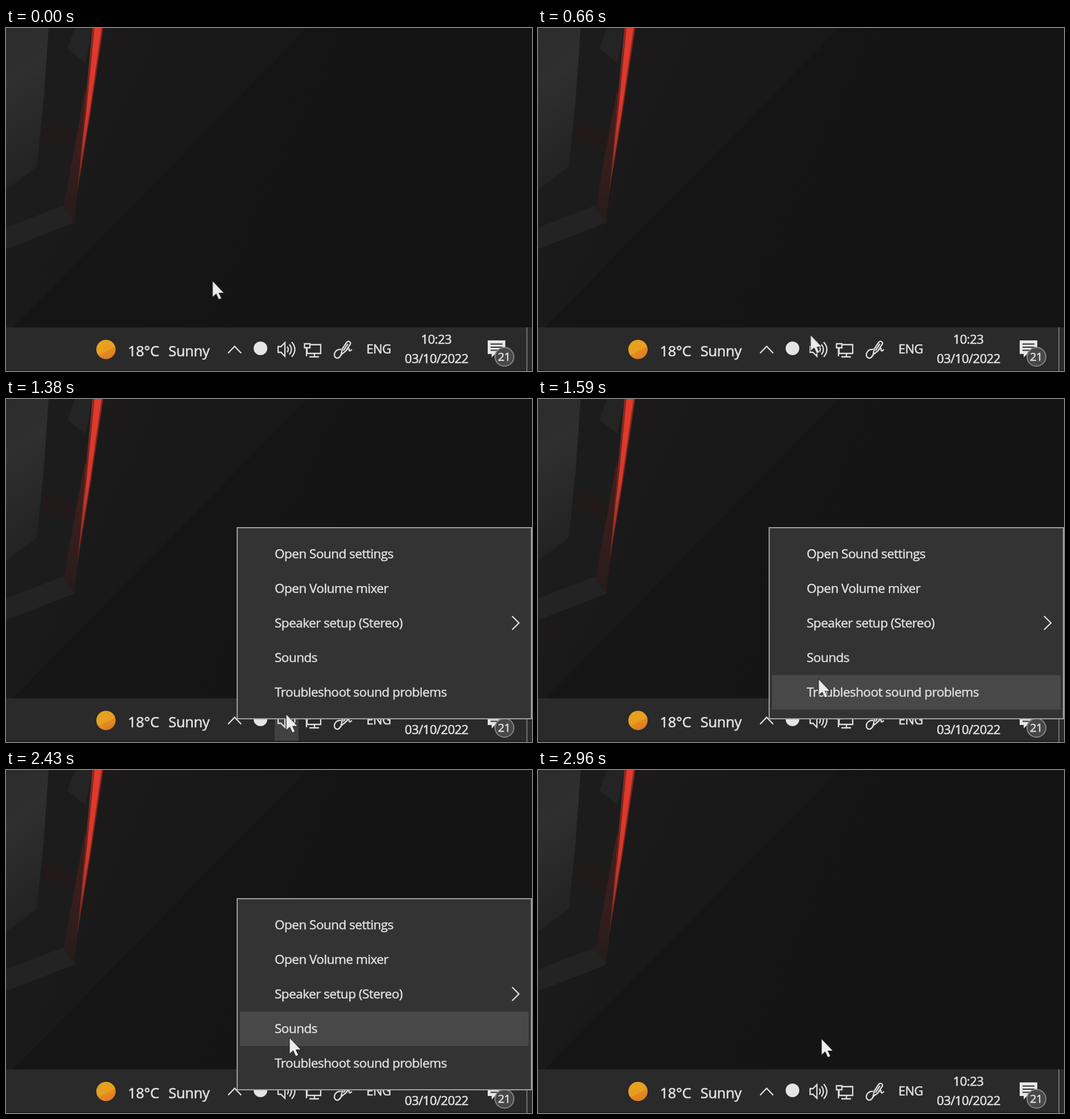
An HTML page that plays this animation: 926x605 px, repeating every 3.03 s.

```html
<!DOCTYPE html>
<html lang="en">
<head>
<meta charset="utf-8">
<title>Opening the sound menu</title>
<style>
  html, body { margin: 0; width: 100%; height: 100%; overflow: hidden; background: #141414; }
  svg { display: block; width: 926px; height: 605px; }
  text {
    font-family: "Open Sans", "Noto Sans", sans-serif;
    font-size: 22px; letter-spacing: -.5px; white-space: pre;
    fill: #e0e0e0; stroke: #e0e0e0; stroke-width: .65px;
  }
  .weather { font-size: 25.5px; letter-spacing: -.3px; }
  .badge { font-size: 20px; }
  .item { font-size: 22.5px; stroke-width: .5px; }
  .line { fill: none; stroke: #dedede; stroke-width: 2.3px; }

  .anim { animation: 3030ms linear infinite both; }
  #cursor { animation-name: move; }
  #menu { animation-name: menu; }
  #hover { animation-name: hover; animation-timing-function: step-end; }
  #last { animation-name: last; animation-timing-function: step-end; }
  #pick { animation-name: pick; animation-timing-function: step-end; }
  #chosen { animation-name: chosen; }

  @keyframes move {
    0%, 3.3% { transform: translate(363.5px, 446px); animation-timing-function: cubic-bezier(.42, 0, .75, .85); }
    21.78% { transform: translate(479.5px, 541px); animation-timing-function: ease-out; }
    28.71%, 42.57% { transform: translate(493px, 567px); animation-timing-function: ease-in; }
    45.54% { transform: translate(493px, 556px); animation-timing-function: cubic-bezier(.3, .3, .6, 1); }
    55.45% { transform: translate(494px, 485px); }
    58.42% { transform: translate(495px, 478px); animation-timing-function: ease-out; }
    64.36%, 80.2% { transform: translate(499px, 472px); }
    82.5%, 100% { transform: translate(499px, 474px); }
  }
  @keyframes menu {
    0%, 35.81% { opacity: 0; }
    42.57%, 82.49% { opacity: 1; }
    82.5%, 100% { opacity: 0; }
  }
  @keyframes hover { 0% { opacity: 0; } 22.6% { opacity: 1; } 47.5% { opacity: 0; } }
  @keyframes last { 0% { opacity: 0; } 46.4% { opacity: 1; } 55.3% { opacity: 0; } }
  @keyframes pick { 0% { opacity: 0; } 55.3% { opacity: 1; } }
  @keyframes chosen {
    0%, 82.49% { opacity: 0; }
    82.5% { opacity: 1; }
    86.4%, 100% { opacity: 0; }
  }
</style>
</head>
<body>
<svg viewBox="0 0 926 605">
  <defs>
    <linearGradient id="wall" x1="0" y1="0" x2="1" y2=".3">
      <stop offset="0" stop-color="#1e1b1c"/>
      <stop offset=".45" stop-color="#181819"/>
      <stop offset="1" stop-color="#161616"/>
    </linearGradient>
    <linearGradient id="panel" x1="0" y1="0" x2=".2" y2="1">
      <stop offset="0" stop-color="#2c2c2c"/>
      <stop offset=".35" stop-color="#2f2f2f"/>
      <stop offset="1" stop-color="#222223"/>
    </linearGradient>
    <linearGradient id="glow" x1="0" y1="0" x2="0" y2="1">
      <stop offset="0" stop-color="#e23a2c"/>
      <stop offset=".5" stop-color="#d6392b"/>
      <stop offset=".75" stop-color="#a83026"/>
      <stop offset="1" stop-color="#5a201b"/>
    </linearGradient>
    <linearGradient id="edge" x1="0" y1="0" x2="0" y2="1">
      <stop offset="0" stop-color="#8c2a22"/>
      <stop offset=".5" stop-color="#6a231d"/>
      <stop offset="1" stop-color="#301c1b"/>
    </linearGradient>
    <linearGradient id="haze" x1="0" y1="0" x2="0" y2="1">
      <stop offset="0" stop-color="#451d1a"/>
      <stop offset=".6" stop-color="#341e1c"/>
      <stop offset="1" stop-color="#251c1c"/>
    </linearGradient>
    <linearGradient id="sun" x1=".25" y1="0" x2=".75" y2="1">
      <stop offset="0" stop-color="#e5a31f"/>
      <stop offset=".55" stop-color="#e99e20"/>
      <stop offset=".6" stop-color="#e48b21"/>
      <stop offset="1" stop-color="#de7921"/>
    </linearGradient>
  </defs>

  <!-- wallpaper -->
  <rect width="926" height="605" fill="url(#wall)"/>
  <path d="M530 0H926V530H10Z" fill="#131313" opacity=".5"/>
  <path d="M0 0H155L138 150 100 312 0 352Z" fill="#1d1c1c"/>
  <path d="M0 0H75L66 130 54 245 0 285Z" fill="url(#panel)"/>
  <path d="M122 0H152L140 62 108 36Z" fill="#252425"/>
  <path d="M70 160L132 190 126 215 66 195Z" fill="#261a1a" opacity=".6"/>
  <path d="M0 352L100 313 121 343 0 390Z" fill="#232324"/>
  <path d="M139 110L146 150 126 290 120 342 101 318Z" fill="url(#haze)"/>
  <path d="M152 0H171L149 150 125 296 135 180Z" fill="url(#edge)"/>
  <path d="M156 0H168L147 150 125 292 137 180 141 150Z" fill="url(#glow)"/>

  <!-- taskbar -->
  <rect y="528" width="926" height="77" fill="#2a2a2a"/>
  <rect y="603" width="926" height="2" fill="#221d20"/>
  <rect x="916" y="528" width="2" height="77" fill="#707070"/>
  <rect id="hover" class="anim" x="473" y="530" width="42" height="73" fill="#414141"/>

  <circle cx="176" cy="567" r="17" fill="url(#sun)"/>
  <text class="weather" x="214.500" y="578.500">18°C</text>
  <text class="weather" x="286" y="578.500">Sunny</text>

  <path class="line" d="M391 573.500L402.500 561.500 414 573.500"/>
  <circle cx="448" cy="565" r="12" fill="#e4e4e4"/>

  <g class="line">
    <path d="M479 562H484L491 555V579L484 572H479Z"/>
    <path d="M495 562Q499 567 495 572M499 558Q506 567 499 576M503 554Q514 567 503 580"/>
  </g>
  <g class="line">
    <path d="M536 558.500H554V574H530V565M525.500 557H535V564H525.500ZM529 564V579M543 574V580M534 580H551"/>
  </g>
  <g class="line">
    <path d="M590 567C581 566 576 574 579 580 584 586 590 579 591 573"/>
    <path d="M590 576L592 566 600 554C603 551 608 554 606 558L598 570ZM594 569L602 557"/>
    <path d="M599 569Q604 562 604 567T609 567"/>
  </g>

  <text x="634.500" y="574">ENG</text>
  <text x="757.500" y="557" text-anchor="middle">10:23</text>
  <text x="758" y="591" text-anchor="middle">03/10/2022</text>

  <path d="M848 551H879V575H861L855 581V575H848Z" fill="#e6e6e6"/>
  <path d="M853 557.500H874M853 563H874M853 568.500H867" stroke="#2c2c2c" stroke-width="2"/>
  <circle cx="877.500" cy="580" r="16.500" fill="#484848" stroke="#858585" stroke-width="2"/>
  <text class="badge" x="877" y="587" text-anchor="middle">21</text>

  <!-- context menu -->
  <g id="menu" class="anim">
    <rect x="407" y="227" width="518" height="337" fill="#333" stroke="#a0a0a0" stroke-width="2"/>
    <rect id="last" class="anim" x="412" y="487" width="508" height="61" fill="#484848"/>
    <rect id="pick" class="anim" x="412" y="426" width="508" height="61" fill="#484848"/>
    <text class="item" x="473" y="281">Open Sound settings</text>
    <text class="item" x="473" y="342">Open Volume mixer</text>
    <text class="item" x="473" y="403">Speaker setup (Stereo)</text>
    <text class="item" x="473" y="464">Sounds</text>
    <text class="item" x="473" y="525">Troubleshoot sound problems</text>
    <path class="line" d="M891 383L903 395 891 407"/>
  </g>
  <g id="chosen" class="anim">
    <rect x="412" y="426" width="508" height="61" fill="#484848"/>
    <text class="item" x="473" y="464">Sounds</text>
  </g>

  <path id="cursor" class="anim" d="M0 0V29L6.500 23 11 33 16 31 11.500 21.500H20.500Z"
    fill="#ececec" stroke="#1a1a1a" stroke-width="1"/>
</svg>
</body>
</html>
```
